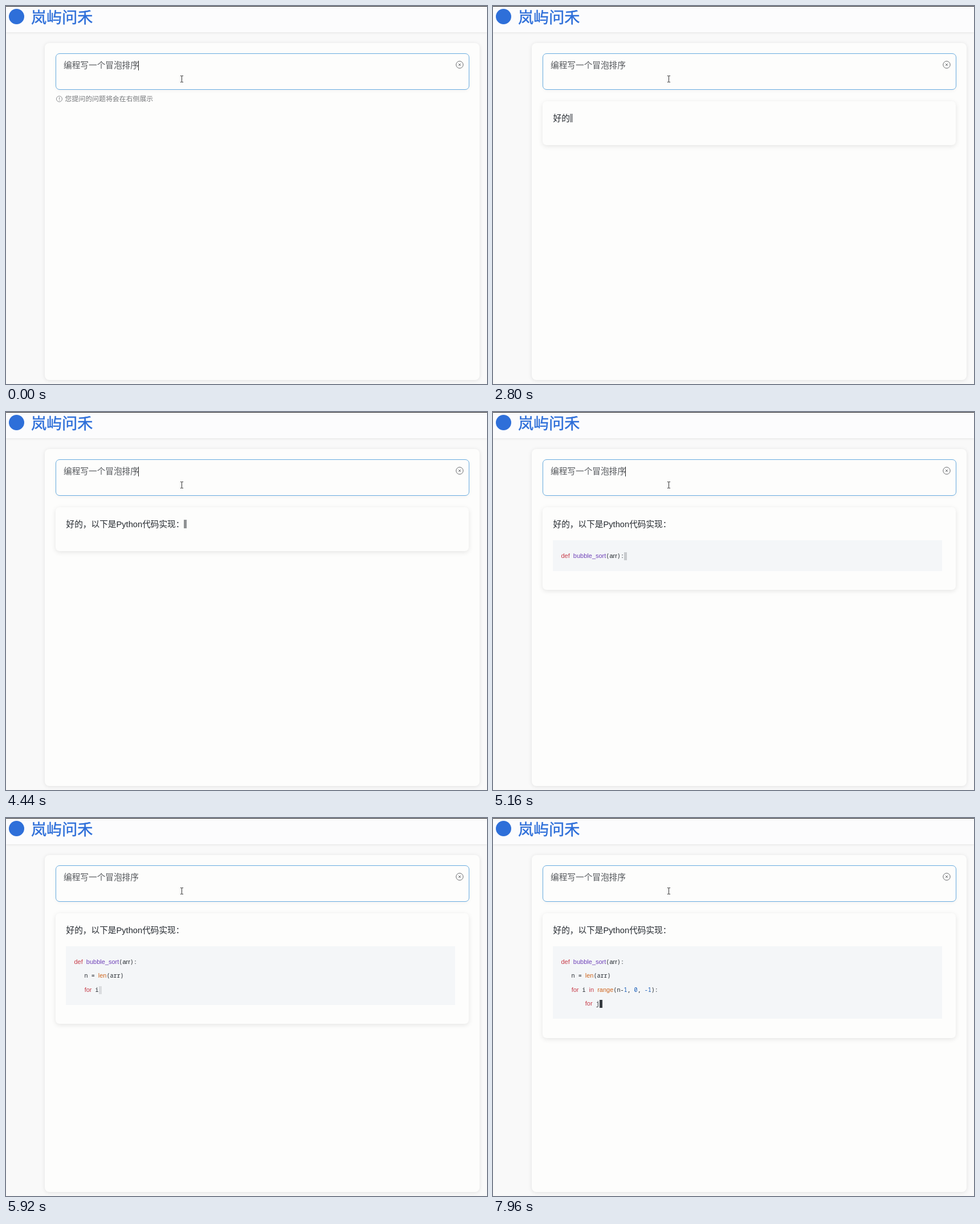
An HTML page for the animation above (8 s loop, 844 by 663 pixels).

```html
<!DOCTYPE html>
<html lang="zh-CN">
<head>
<meta charset="utf-8">
<style>
html, body { margin: 0; width: 100%; height: 100%; overflow: hidden; }
body { position: relative; background: #f9f9f9; color: #24292f;
  font: 14.67px/24px "Liberation Sans", "Noto Sans CJK SC", "Noto Sans CJK", sans-serif; }
body > *, .block { position: absolute; box-sizing: border-box; white-space: pre; }
header { left: 0; top: 0; width: 100%; height: 46px; background: #fcfcfd;
  border-top: 1px solid #1c1c1e; box-shadow: 0 1px 4px rgba(0,0,0,.09); }
h1 { margin: 0; left: 44px; top: -1px; color: #2e6fd9; -webkit-text-stroke: .5px #2e6fd9;
  font: 500 27.1px/40px "Noto Sans CJK SC", "Noto Sans CJK", sans-serif; }
.logo { left: 5px; top: 5px; width: 27px; height: 27px; border-radius: 50%; background: #2e6fd9; }
.panel { left: 68px; top: 65px; width: 763px; height: 591px; border-radius: 8px;
  background: #fdfdfc; box-shadow: 0 1px 7px rgba(0,0,0,.1); }
.input { left: 86.5px; top: 83px; width: 726px; height: 64px; padding: 8px 0 0 13.5px;
  border: 1px solid #69ace0; border-radius: 7px; background: #fdfdfc; color: #55585c;
  box-shadow: 0 2px 6px rgba(0,0,0,.04); }
#caret { left: 232px; top: 96px; width: 1px; height: 17px; background: #222; }
#hint { left: 103.5px; top: 151px; color: #76787b; font-size: 11.92px; }
#card { left: 87px; top: 167px; width: 725px; border-radius: 7px; background: #fdfdfc;
  box-shadow: 0 2px 9px rgba(0,0,0,.1); }
#say { left: 18.5px; top: 18px; }
#code { left: 18px; top: 58px; width: 683px; padding: 14.5px; background: #f4f6f8;
  font: 10.07px/24.5px "Noto Sans Mono", "DejaVu Sans Mono", monospace; }
#code div { height: 24.5px; }
.kw, .fn, .bi, .arg { font: 11px/1 "Liberation Sans", Arial, sans-serif; }
.kw { color: #c73c49; }
.fn { color: #6f42b8; }
.bi { color: #cf661f; }
.num { color: #165cb8; }
#cursor { display: inline-block; width: 5px; height: 15px; background: #24292f; vertical-align: -2.3px; }
#code #cursor { height: 14px; vertical-align: -4px; }
svg { left: 0; top: 0; fill: none; stroke: #696b6e; }
#hint svg { position: absolute; left: -17px; top: 5px; stroke: #8a8c8f; }
</style>
</head>
<body>
<header></header>
<div class="logo"></div>
<h1>岚屿问禾</h1>
<div class="panel"></div>
<div class="input">编程写一个冒泡排序</div>
<div id="caret"></div>
<div id="hint">您提问的问题将会在右侧展示<svg width="14" height="14">
  <circle cx="6.5" cy="7" r="5"/><path d="M6.5 4v3.8M6.5 8.8v1.2"/></svg></div>
<div id="card"><div class="block" id="say"></div><div class="block" id="code"></div></div>
<svg width="844" height="663">
  <circle cx="796" cy="103" r="6.2"/>
  <path d="M794 101l4 4m0-4l-4 4"/>
  <path d="M306 122.5h2l.5 .5l.5-.5h2M308.5 123v10M306 133.5h2l.5-.5l.5 .5h2" stroke="#333"/>
</svg>
<script>
const LOOP = 8000, SENT = 200, CARET = 530, PULSE = 1000;

// Streamed chunks: arrival time, then [class, text] pieces; a leading newline opens a line.
const chunks = [
  [2575, ['', '\n好的']],
  [3250, ['', '，']],
  [3560, ['', '以下是']],
  [3880, ['', 'Python']],
  [4190, ['', '代码实现：']],
  [4680, ['kw', '\ndef']],
  [5010, ['', ' '], ['fn', 'bubble_sort'], ['', '('], ['arg', 'arr'], ['', '):']],
  [5330, ['', '\n   n = '], ['bi', 'len'], ['', '(arr)']],
  [5600, ['', '\n   '], ['kw', 'for']],
  [5805, ['', ' i']],
  [6120, ['', ' '], ['kw', 'in'], ['', ' '], ['bi', 'range']],
  [6400, ['', '(n-'], ['num', '1'], ['', ', '], ['num', '0'], ['', ', ']],
  [6720, ['num', '-1'], ['', '):']],
  [7240, ['', '\n       '], ['kw', 'for'], ['', ' ']],
  [7560, ['', 'j']]
];

const el = id => document.getElementById(id);
const show = (id, on) => el(id).style.visibility = on ? 'visible' : 'hidden';
let shown = -1;

function layout(count) {
  const lines = [];
  for (const [, ...pieces] of chunks.slice(0, count))
    for (const [cls, text] of pieces) {
      if (text[0] === '\n') lines.push('');
      lines[lines.length - 1] += `<span class="${cls}">${text.replace('\n', '')}</span>`;
    }
  const n = lines.length;
  if (n) lines[n - 1] += '<span id="cursor"></span>';
  el('say').innerHTML = lines[0] || '';
  el('code').innerHTML = lines.slice(1).map(line => `<div>${line}</div>`).join('');
  el('code').style.display = n > 1 ? '' : 'none';
  el('card').style.height = (n < 2 ? 66 + 11 * n : 145 + 24.5 * (n - 2)) + 'px';
}

function draw(now) {
  const t = now % LOOP;
  const count = chunks.filter(([at]) => at <= t).length;
  if (count !== shown) layout(shown = count);
  show('hint', t < SENT);
  show('card', t >= SENT);
  show('caret', Math.floor((t - 280) / CARET) % 2 !== 0);
  if (count) {
    const age = t - chunks[count - 1][0];
    el('cursor').style.opacity = .5 - .5 * Math.cos(2 * Math.PI * age / PULSE);
  }
  requestAnimationFrame(draw);
}
requestAnimationFrame(draw);
</script>
</body>
</html>
```
